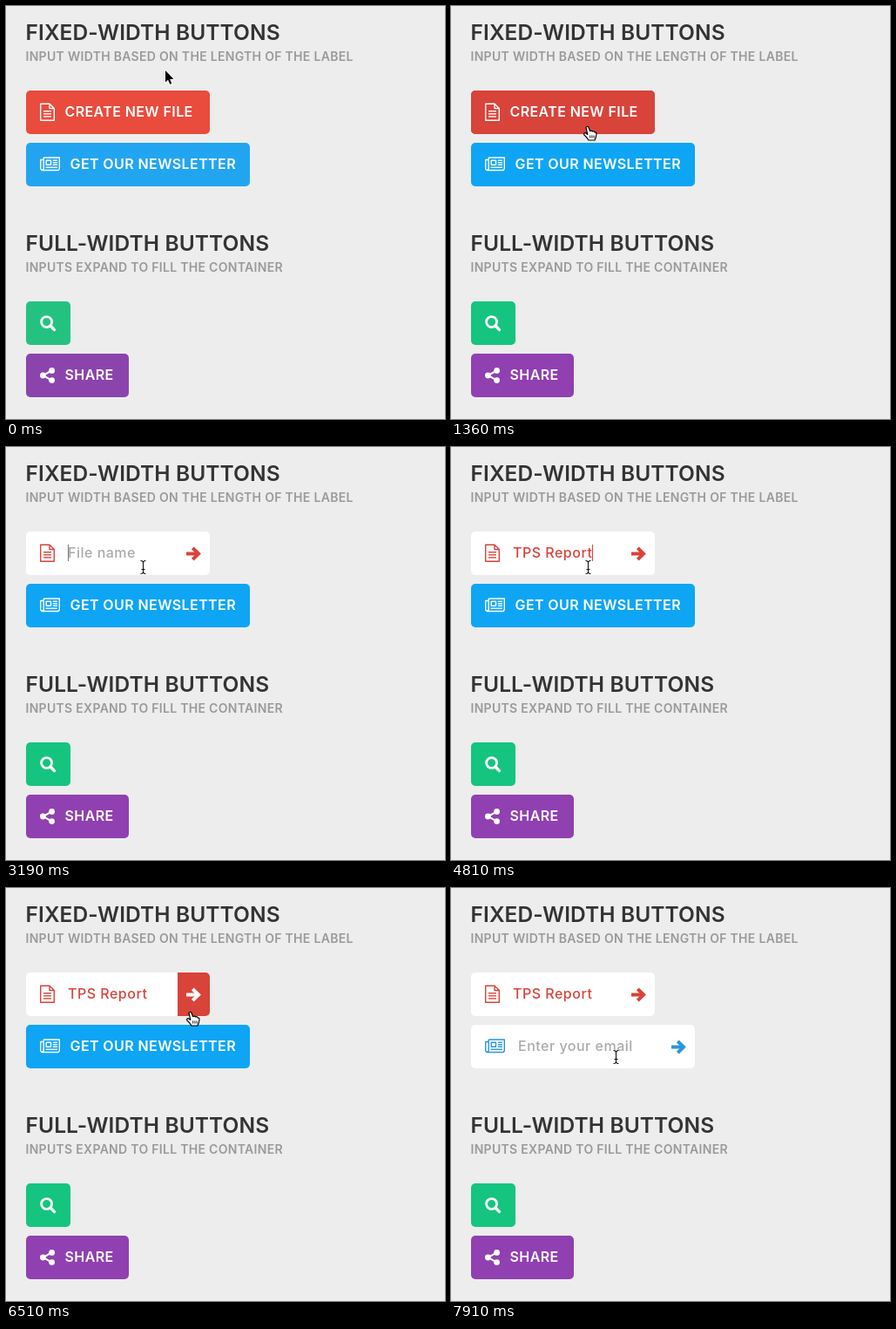
An HTML page with a canvas for the animation above (8 s loop, 504 px wide and 474 px high).

```html
<!DOCTYPE html>
<html lang="en">
<head>
<meta charset="utf-8">
<title>Button inputs</title>
<style>
html, body { margin: 0; width: 100%; height: 100%; overflow: hidden; background: #ededed; }
canvas { display: block; }
</style>
</head>
<body>
<canvas id="stage" width="504" height="474"></canvas>
<script>
const ctx = document.getElementById('stage').getContext('2d');
const LOOP = 8000;
const RED = '#d8433a', BLUE = '#2b95df';

// Key moments in ms
const ENTER_FILE = 945, PRESS_FILE = 2110, OPEN_FILE = 2200;
const ENTER_SEND = 5950, LEAVE_SEND = 6573;
const ENTER_NEWS = 6660, PRESS_NEWS = 7370, OPEN_NEWS = 7400;

const FILE_NAME = 'TPS Report';
const KEYS = [3310, 3490, 3580, 3790, 4060, 4270, 4370, 4470, 4570, 4810];
const BLINKS = [OPEN_FILE, 2710, 3190, 5290, 5780, 6250, 6740, 7220];
const MOVES = [
  { start: 630, end: 1360, from: [183, 74], to: [157, 138] },
  { start: 5710, end: 6100, from: [157, 138], to: [213, 140] },
  { start: 6450, end: 7010, from: [213, 140], to: [189, 194] }
];
const CURSORS = [
  [0, arrowCursor], [ENTER_FILE, handCursor], [PRESS_FILE, beamCursor],
  [ENTER_SEND, handCursor], [LEAVE_SEND, arrowCursor],
  [ENTER_NEWS, handCursor], [PRESS_NEWS, beamCursor]
];

const STYLES = {
  title: { font: '600 24.5px', gap: 0.1, color: '#333' },
  sub: { font: '600 14px', gap: 0.3, color: '#999' },
  label: { font: '600 16px', gap: 0.4, color: '#fff' },
  input: { font: '500 16px', gap: 0.5, color: '#aaa' }
};

const clamp = v => Math.max(0, Math.min(1, v));
const ease = v => v * v * (3 - 2 * v);
const fade = (t, start, length = 200) => clamp((t - start) / length);
const passed = (times, t) => times.filter(at => at <= t).length;

function text(str, x, y, style, color = style.color) {
  ctx.font = style.font + ' Inter, "Open Sans", sans-serif';
  ctx.letterSpacing = style.gap + 'px';
  ctx.fillStyle = color;
  ctx.fillText(str, x, y);
  return ctx.measureText(str).width;
}

function box(x, y, w, h, color, radii = 5, alpha = 1) {
  ctx.globalAlpha = alpha;
  ctx.fillStyle = color;
  ctx.beginPath();
  ctx.roundRect(x, y, w, h, radii);
  ctx.fill();
  ctx.globalAlpha = 1;
}

function line(points, closed) {
  ctx.beginPath();
  for (let i = 0; i < points.length; i += 2) ctx.lineTo(points[i], points[i + 1]);
  if (closed) ctx.closePath();
  ctx.stroke();
}

function dot(x, y, r) {
  ctx.beginPath();
  ctx.arc(x, y, r, 0, Math.PI * 2);
}

function pen(color, width, join = 'miter', cap = 'butt') {
  ctx.strokeStyle = ctx.fillStyle = color;
  ctx.lineWidth = width;
  ctx.lineJoin = join;
  ctx.lineCap = cap;
}

function fileIcon(color) {
  pen(color, 1.4, 'round');
  line([39.7, 112.2, 50, 112.2, 55.3, 117.5, 55.3, 131.2, 39.7, 131.2], true);
  line([50, 112.2, 50, 117.5, 55.3, 117.5]);
  for (const y of [120.7, 123.8, 126.9]) line([43, y, 52, y]);
}

function newsIcon(color) {
  pen(color, 1.4, 'round');
  line([43.2, 174, 61.3, 174, 61.3, 187, 60, 188.5, 41.2, 188.5, 39.7, 187, 39.7, 176.5, 43.2, 176.5]);
  line([43.2, 174, 43.2, 187, 41.5, 188.5]);
  line([46.2, 177.2, 51.5, 177.2, 51.5, 182.2, 46.2, 182.2], true);
  for (const y of [177.2, 179.7, 182.2]) line([53.7, y, 59, y]);
  line([45.5, 185.2, 59, 185.2]);
}

function searchIcon() {
  pen('#fff', 2.8, 'round', 'round');
  dot(46.6, 362.6, 6);
  ctx.stroke();
  ctx.lineWidth = 3.4;
  line([51.3, 367.3, 55.5, 371.6]);
}

function shareIcon() {
  pen('#fff', 2);
  line([52.6, 418.4, 42.4, 424, 52.6, 429.6]);
  for (const [x, y] of [[42.4, 424], [52.6, 418.4], [52.6, 429.6]]) {
    dot(x, y, 3.4);
    ctx.fill();
  }
}

function sendIcon(x, y, color) {
  pen(color, 4);
  line([x, y, x + 13, y]);
  line([x + 7.3, y - 6.6, x + 14, y, x + 7.3, y + 6.6]);
}

function caret(x, y, color) {
  ctx.fillStyle = color;
  ctx.fillRect(Math.round(x), y, 1, 19);
}

function arrowCursor() {
  ctx.beginPath();
  for (const [x, y] of [[0, 0], [0, 13.5], [3, 10.8], [5.2, 15.8], [7.3, 14.9], [5.2, 10], [9.4, 9.8]]) ctx.lineTo(x, y);
  ctx.closePath();
  pen('#fff', 2, 'round');
  ctx.stroke();
  ctx.fillStyle = '#000';
  ctx.fill();
}

function handCursor() {
  ctx.beginPath();
  ctx.moveTo(-2, 1.4);
  ctx.quadraticCurveTo(-0.6, -0.8, 1, 1.2);
  ctx.lineTo(2.6, 5.6);
  ctx.quadraticCurveTo(4.4, 4.4, 5.4, 6);
  ctx.quadraticCurveTo(7.2, 5, 8, 7);
  ctx.quadraticCurveTo(10, 6.6, 10, 9);
  ctx.lineTo(9.2, 13);
  ctx.lineTo(8, 16);
  ctx.lineTo(1, 16);
  ctx.quadraticCurveTo(-1, 12.6, -4.3, 9.8);
  ctx.quadraticCurveTo(-4.6, 7.2, -2.4, 7.8);
  ctx.lineTo(-0.2, 9.4);
  ctx.closePath();
  pen('#000', 1.2, 'round');
  ctx.fillStyle = '#fff';
  ctx.fill();
  ctx.stroke();
  ctx.lineWidth = 0.9;
  for (const x of [2.6, 4.8, 7]) line([x, 10.4, x + 0.2, 13.6]);
}

function beamCursor() {
  for (const [color, width] of [['rgba(255,255,255,.6)', 2.4], ['#111', 1.1]]) {
    pen(color, width);
    line([-2.5, -7.5, -0.8, -7.2, 0.5, -6, 1.8, -7.2, 3.5, -7.5]);
    line([0.5, -6, 0.5, 6]);
    line([-2.5, 7.5, -0.8, 7.2, 0.5, 6, 1.8, 7.2, 3.5, 7.5]);
    line([-1.5, 2.5, 2.5, 2.5]);
  }
}

function pointer(t) {
  let [x, y] = MOVES[0].from;
  for (const m of MOVES) {
    if (t < m.start) break;
    const k = ease(clamp((t - m.start) / (m.end - m.start)));
    x = m.from[0] + (m.to[0] - m.from[0]) * k;
    y = m.from[1] + (m.to[1] - m.from[1]) * k;
  }
  const shape = CURSORS[passed(CURSORS.map(c => c[0]), t) - 1][1];
  ctx.save();
  ctx.translate(Math.round(x), Math.round(y));
  shape();
  ctx.restore();
}

function fileButton(t) {
  if (t < OPEN_FILE) {
    box(23, 97, 211, 50, '#e94b3c');
    box(23, 97, 211, 50, RED, 5, fade(t, ENTER_FILE));
    fileIcon('#fff');
    text('CREATE NEW FILE', 67.5, 127, STYLES.label);
    return;
  }
  box(23, 97, 211, 50, '#fff');
  fileIcon(RED);
  const typed = FILE_NAME.slice(0, passed(KEYS, t));
  const width = text(typed || 'File name', 71, 127, STYLES.input, typed ? RED : undefined);
  if (passed(BLINKS, t) % 2) caret(typed ? 71 + width : 71, 112, typed ? RED : '#777');

  const hover = fade(t, ENTER_SEND, 120) - fade(t, LEAVE_SEND, 120);
  box(197, 97, 37, 50, RED, [0, 5, 5, 0], hover);
  sendIcon(207, 122.5, hover > 0.5 ? '#fff' : RED);
}

function newsButton(t, base) {
  if (t < OPEN_NEWS) {
    box(23, 157, 257, 50, base);
    box(23, 157, 257, 50, BLUE, 5, fade(t, ENTER_NEWS));
    newsIcon('#fff');
    text('GET OUR NEWSLETTER', 73.5, 187, STYLES.label);
    return;
  }
  box(23, 157, 257, 50, '#fff');
  newsIcon(BLUE);
  text('Enter your email', 77, 187, STYLES.input);
  if (t < 7910) caret(77, 172, '#777');
  sendIcon(253, 182.5, BLUE);
}

function draw(t) {
  const [blue, green, purple] = t < ENTER_FILE
    ? ['#22a5f1', '#24c281', '#8c44ad']
    : ['#0ea5f5', '#15c47f', '#9040b0'];
  ctx.fillStyle = '#ededed';
  ctx.fillRect(0, 0, 504, 474);

  text('FIXED-WIDTH BUTTONS', 22.5, 39, STYLES.title);
  text('INPUT WIDTH BASED ON THE LENGTH OF THE LABEL', 22.5, 63, STYLES.sub);
  fileButton(t);
  newsButton(t, blue);

  text('FULL-WIDTH BUTTONS', 22.5, 281, STYLES.title);
  text('INPUTS EXPAND TO FILL THE CONTAINER', 22.5, 305, STYLES.sub);
  box(23, 339, 51, 50, green);
  searchIcon();
  box(23, 399, 118, 50, purple);
  shareIcon();
  text('SHARE', 67.5, 429, STYLES.label);

  pointer(t);
}

const begin = performance.now();
function tick() {
  draw((performance.now() - begin) % LOOP);
  requestAnimationFrame(tick);
}
tick();
</script>
</body>
</html>
```
